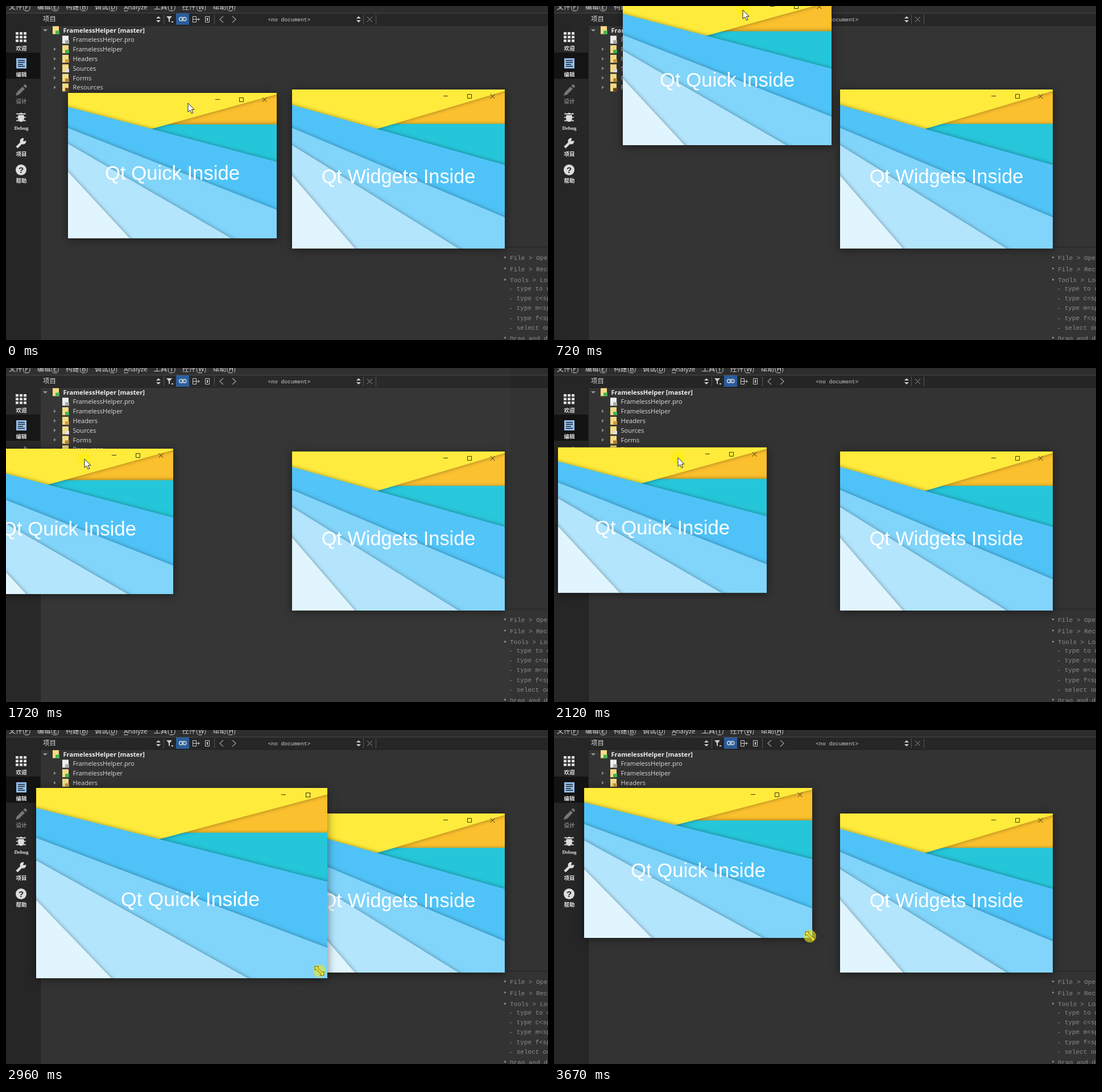
An HTML page with a canvas that plays this animation: 953x588 px, repeating every 3.74 s.

```html
<!DOCTYPE html>
<html>
<head>
<meta charset="utf-8">
<style>
html, body { margin: 0; width: 100%; height: 100%; overflow: hidden; background: #333 }
canvas { display: block }
</style>
</head>
<body>
<canvas id="stage" width="953" height="588"></canvas>
<script>
const g = document.getElementById('stage').getContext('2d');
const LOOP = 3740, STEP = 78, LAST = 47;
const UI = '"Open Sans", sans-serif', CJK = '"Noto Sans CJK SC", "Noto Sans CJK", sans-serif';
const MONO = '"Liberation Mono", monospace', ARIAL = '"Liberation Sans", sans-serif';

// Turning points of the drag: step, left, top
const drag = [[0, 109, 153], [3, 212, 172], [6, 23, 150], [7, 80, 149], [9, 121, -11], [13, 110, -18],
  [15, -42, 48], [19, -205, 115], [22, -73, 142], [31, 71, 138], [34, 71, 138], [36, 53, 102]];
// Turning points of the resize: step, width, height
const resize = [[34, 367, 256], [37, 542, 364], [38, 512, 335], [40, 488, 315], [45, 488, 315], [47, 401, 264]];

function along(keys, k) {
  const i = keys.findIndex(key => key[0] > k);
  if (i < 1) return (i ? keys[keys.length - 1] : keys[0]).slice(1);
  const a = keys[i - 1], b = keys[i], u = (k - a[0]) / (b[0] - a[0]);
  return [a[1] + (b[1] - a[1]) * u, a[2] + (b[2] - a[2]) * u];
}

function rect(x, y, w, h, color) {
  g.fillStyle = color;
  g.fillRect(x, y, w, h);
}

function text(s, x, y, font, color, align = 'left') {
  g.font = font;
  g.fillStyle = color;
  g.textAlign = align;
  g.fillText(s, x, y);
}

function path(points, close) {
  g.beginPath();
  for (let i = 0; i < points.length; i += 2) g.lineTo(points[i], points[i + 1]);
  if (close) g.closePath();
}

function fill(points, color) {
  path(points, true);
  g.fillStyle = color;
  g.fill();
}

function line(points, color, width = 1, close = false) {
  path(points, close);
  g.strokeStyle = color;
  g.lineWidth = width;
  g.stroke();
}

function disc(x, y, r, color) {
  g.beginPath();
  g.arc(x, y, r, 0, 7);
  g.fillStyle = color;
  g.fill();
}

function box(x, y, w, h, color) {
  line([x, y, x + w, y, x + w, y + h, x, y + h], color, 1, true);
}

function cross(x, y, r, color) {
  line([x - r, y - r, x + r, y + r], color);
  line([x + r, y - r, x - r, y + r], color);
}

function spinner(x) {
  for (const d of [-1, 1]) fill([x - 4, 23.5 + d * 1.5, x, 23.5 + d * 5.5, x + 4, 23.5 + d * 1.5], '#ccc');
}

function menuBar() {
  rect(0, 0, 953, 12, '#2d2d2d');
  rect(0, 12, 953, 1, '#484848');
  let x = 5;
  for (const s of ['文件(F)', '编辑(E)', '构建(B)', '调试(D)', 'Analyze', '工具(T)', '控件(W)', '帮助(H)']) {
    const latin = s === 'Analyze';
    text(s, x, 6, latin ? '11.5px ' + UI : '12px ' + CJK, '#d8d8d8');
    rect(latin ? x : x + 28, 8, 7, 1, '#ccc');
    x += g.measureText(s).width + 11;
  }
}

function toolBar() {
  rect(61, 13, 892, 21, '#262626');
  rect(61, 34, 892, 1, '#202020');
  text('项目', 65, 27, '11.5px ' + CJK, '#d8d8d8');
  spinner(268);
  spinner(620);
  for (const x of [277, 366, 628, 650]) rect(x, 15, 1, 17, '#555');
  fill([282, 18, 292, 18, 288, 23, 288, 29, 286, 27, 286, 23], '#ccc');
  rect(291, 27, 3, 2, '#ccc');
  rect(299, 13, 23, 20, '#2a5d9c');
  g.beginPath();
  g.roundRect(304.5, 20, 6.5, 6, 3);
  g.roundRect(310.5, 20, 6.5, 6, 3);
  g.strokeStyle = '#ddd';
  g.lineWidth = 1.3;
  g.stroke();
  line([308, 23, 314, 23], '#ddd');
  box(328.5, 18.5, 6, 10, '#ccc');
  line([328, 23.5, 341, 23.5], '#ccc');
  line([338.5, 21, 338.5, 26], '#ccc');
  box(350.5, 18.5, 7, 10, '#ccc');
  rect(353, 21, 2, 5, '#ccc');
  line([382, 18, 376, 23.5, 382, 29], '#999', 1.3);
  line([398, 18, 404, 23.5, 398, 29], '#999', 1.3);
  text('<no document>', 460.5, 27, '9.6px ' + MONO, '#d0d0d0');
  cross(639.5, 23.5, 4.5, '#999');
}

function sideBar() {
  rect(0, 13, 60, 575, '#262626');
  rect(60, 13, 1, 575, '#202020');
  rect(0, 82, 60, 46, '#131313');
  for (let i = 0; i < 9; i++) rect(17 + i % 3 * 7, 46 + Math.floor(i / 3) * 6.5, 5, 4.5, '#ddd');
  rect(18, 92, 18, 18, '#90bdf0');
  for (let i = 0; i < 4; i++) rect(21, 95 + i * 3.5, i === 2 ? 9 : 12, 1.5, '#222');
  fill([17, 158, 19, 152, 29, 142, 33, 146, 23, 156], '#777');
  line([32, 139, 36, 143], '#777', 4);
  // bug
  for (const y of [190, 196, 202]) line([18, y, 35, y], '#ddd', 1.5);
  cross(26.5, 195, 7, '#ddd');
  g.beginPath();
  g.ellipse(26.5, 196, 5.5, 8, 0, 0, 7);
  g.fillStyle = '#ddd';
  g.fill();
  rect(22, 191, 9, 1, '#262626');
  // wrench
  line([19, 249, 28, 240], '#ddd', 4.5);
  disc(30, 238, 5.5, '#ddd');
  fill([30, 238, 32, 231, 38, 237], '#262626');
  disc(26.5, 288.5, 9.5, '#ddd');
  text('?', 26.5, 294, 'bold 15px ' + ARIAL, '#222', 'center');
  ['欢迎', '编辑', '设计', 'Debug', '项目', '帮助'].forEach((s, i) => {
    const font = s === 'Debug' ? 'bold 9px "Liberation Serif", serif' : 'bold 9.5px ' + CJK;
    text(s, 27, 77.5 + i * 46.7, font, i === 2 ? '#888' : '#e4e4e4', 'center');
  });
}

function tree() {
  fill([65, 41, 73, 41, 69, 45], '#999');
  const rows = ['FramelessHelper [master]', 'FramelessHelper.pro', 'FramelessHelper',
    'Headers', 'Sources', 'Forms', 'Resources'];
  const badges = ['#41b552', '#aaa', '#41b552', '#d09a40', '#dde', '#b88430', '#654321'];
  rows.forEach((s, i) => {
    const y = 42.5 + i * 16.8, x = i ? 99 : 82;
    rect(x, y - 7, 11, 14, i === 1 ? '#eee' : '#f6dc83');
    rect(x + 5, y + 1, 7, 6, badges[i]);
    if (i > 1) fill([84, y - 3, 88, y, 84, y + 3], '#888');
    text(s, i ? 117.5 : 100.5, y + 4, (i ? '' : 'bold ') + '11.15px ' + UI, i ? '#ddd' : '#eee');
  });
}

function hints() {
  const font = '11px ' + MONO, gray = '#8b8b8b';
  const bullet = (s, y) => {
    disc(877.5, y - 4.5, 1.7, gray);
    text(s, 886, y, font, gray);
  };
  rect(876, 424, 77, 1, '#222');
  ['File > Open', 'File > Recent', 'Tools > Locate'].forEach((s, i) => bullet(s, 447 + i * 19.6));
  ['type to open', 'type c<space>', 'type m<space>', 'type f<space>', 'select one'].forEach((s, i) =>
    text('- ' + s, 884.5, 501 + i * 17.2, font, gray));
  bullet('Drag and drop', 588.5);
}

// Overlapping paper sheets: colour, height at the left edge, slope, side that is filled
const sheets = [
  ['#fbc02d', 0, 0, 3], ['#26c6da', .2165, 0, 3], ['#ffeb3b', .406, -.396, -1],
  ['#4fc3f7', .097, .377, 3], ['#81d4fa', .241, .5625, 3], ['#b3e5fc', .35, .831, 3], ['#e1f5fe', .542, 1.55, 3]
];

function appWindow(x, y, w, h, label, size, W = w, H = h, zoom = 1) {
  g.save();
  g.shadowColor = 'rgba(0,0,0,.5)';
  g.shadowBlur = 15;
  g.shadowOffsetY = 2;
  rect(x, y, w, h, '#333');
  g.restore();

  g.save();
  g.beginPath();
  g.rect(x, y, w, h);
  g.clip();
  g.translate(x, y);
  g.shadowColor = 'rgba(0,0,0,.4)';
  g.shadowBlur = 7;
  for (const [color, top, slope, side] of sheets) {
    const edge = u => (top + slope * u) * H;
    fill([-.1 * W, edge(-.1), 1.1 * W, edge(1.1), 1.1 * W, side * H, -.1 * W, side * H], color);
  }
  g.shadowColor = 'transparent';

  text(label, W / 2, H / 2 + 25 * zoom, size * zoom + 'px ' + ARIAL, '#fff', 'center');
  g.translate(W, 0);
  g.scale(zoom, zoom);
  const ink = '#38331c';
  rect(-108, 11, 8, 1, ink);
  box(-65.5, 8.5, 7, 7, ink);
  cross(-21.5, 12, 4, ink);
  g.restore();
}

// Translucent snap preview that swells, then shrinks away while fading
function snap(k, from, to, insetLeft, insetRight) {
  const u = (k - from) / (to - from);
  if (u < 0 || u > 1) return;
  const inset = (2 * u - 1) ** 4, left = insetLeft * inset;
  rect(left, 0, 953 - left - insetRight * inset, 588, `rgba(255,255,255,${.08 * Math.sin(Math.PI * u)})`);
}

function cursor(x, y, shape, body, outline) {
  const p = shape.map((v, i) => v + (i % 2 ? y : x));
  fill(p, body);
  line(p, outline, 1, true);
}

const arrow = [0, 0, 0, 15.5, 3.7, 12.2, 6.2, 18, 8.8, 17, 6.3, 11.3, 11, 11.3];
const half = [-3, -5.5, -1, -8, -8, -8, -8, -1, -5.5, -3];
const sizer = [...half, ...half.map(v => -v)];

function draw(now) {
  const k = Math.min(LAST, Math.floor(now % LOOP / STEP + .1));
  const [x, y] = along(drag, k), [w, h] = along(resize, k);

  rect(0, 0, 953, 588, '#333');
  menuBar();
  sideBar();
  toolBar();
  tree();
  hints();
  appWindow(503, 147, 374, 280, 'Qt Widgets Inside', 34.3);
  snap(k, 8.9, 16.8, 33, 0);
  snap(k, 18, 22.3, 0, 120);

  // The content trails the frame when the enlarged window first shrinks
  const trailing = k === 38;
  const content = trailing ? [...along(resize, k - 1), 1.03] : [];
  appWindow(x, y, w, h, 'Qt Quick Inside', 34.67, ...content);

  if (k > 34) {
    const gap = trailing ? 14 : 4, cx = x + w - gap, cy = y + h - gap + 1;
    disc(cx, cy, 11, 'rgba(235,230,40,.62)');
    cursor(cx, cy, sizer, '#f3e62a', '#6b6420');
  } else {
    // On fast moves the pointer runs ahead of the window
    const [ax, ay] = along(drag, k + .75);
    const fast = Math.hypot(ax - x, ay - y) > 28;
    const cx = (fast ? ax : x) + 211, cy = (fast ? ay : y) + 18;
    if (k > 0) disc(cx, cy, 11, 'rgba(255,240,0,.55)');
    cursor(cx, cy, arrow, '#fff', '#222');
  }
}

const start = performance.now();
function frame() {
  draw(performance.now() - start);
  requestAnimationFrame(frame);
}
frame();
</script>
</body>
</html>
```
